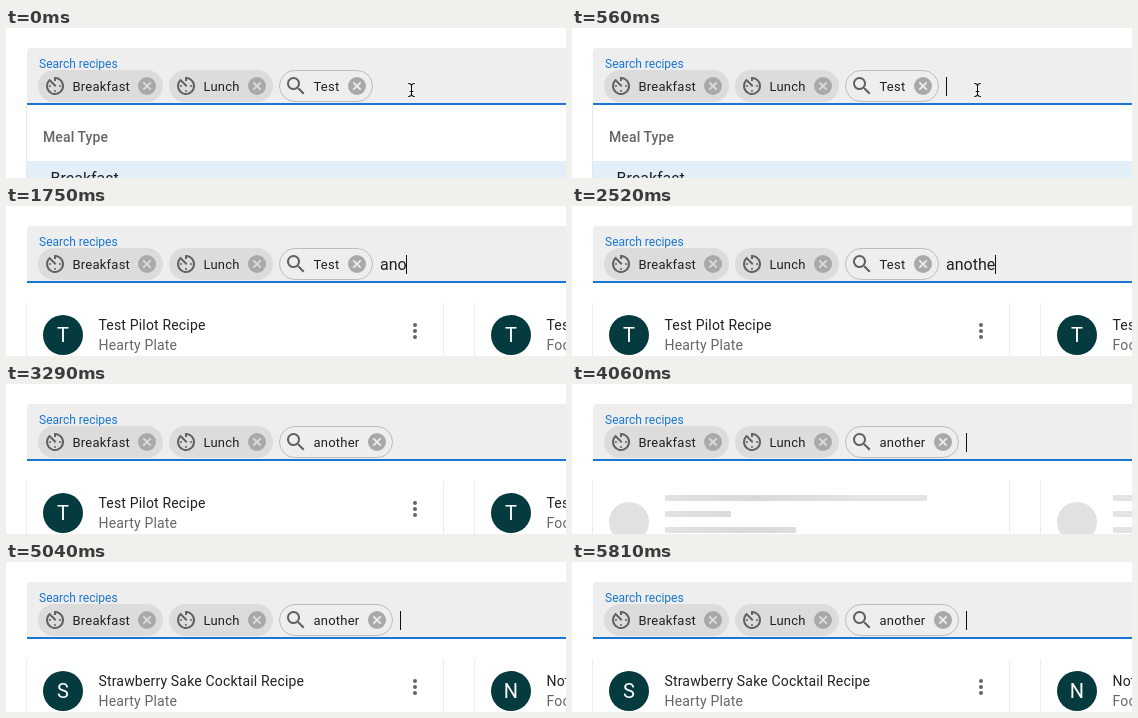
An HTML page that plays this animation: 560x150 px, repeating every 5880 ms.

```html
<!DOCTYPE html>
<html lang="en">
<head>
<meta charset="utf-8">
<title>Recipe search</title>
<style>
  html, body { margin: 0; width: 100%; height: 100%; overflow: hidden; background: #fff; }
  svg { display: block; font-family: Roboto, Arial, sans-serif; }
  .label { font-size: 12px; fill: #1976d2; }
  .chip { font-size: 13px; letter-spacing: .232px; fill: #212121; }
  .typed { font-size: 16px; fill: #212121; }
  .title { font-size: 14px; letter-spacing: .17px; fill: #212121; }
  .sub { font-size: 14px; letter-spacing: .17px; fill: #666; }
  .group { font-size: 14px; font-weight: 500; letter-spacing: .1px; fill: #666; }
  .letter { font-size: 20px; fill: #fff; text-anchor: middle; }
  .icon { fill: #616161; }
</style>
</head>
<body>
<svg id="stage" width="560" height="150" viewBox="0 0 560 150">
  <defs>
    <path id="timer" d="M11 17a1 1 0 0 0 2 0a1 1 0 0 0-2 0M11 3v4h2V5.08A7 7 0 1 1 6.58 7.58L12 13l1.41-1.41l-6.8-6.8v.02A9 9 0 1 0 12 3M18 12a1 1 0 0 0-2 0a1 1 0 0 0 2 0M6 12a1 1 0 0 0 2 0a1 1 0 0 0-2 0z"/>
    <path id="search" d="M15.5 14h-.79l-.28-.27A6.5 6.5 0 1 0 13.73 14.43l.27.28v.79l5 4.99L20.49 19zM9.5 14a4.5 4.5 0 1 1 0-9a4.5 4.5 0 0 1 0 9z"/>
    <linearGradient id="shine" gradientUnits="userSpaceOnUse" x1="0" x2="200" y1="0" y2="0">
      <stop offset="0" stop-color="#e3e3e3"/>
      <stop offset=".5" stop-color="#d9d9d9"/>
      <stop offset="1" stop-color="#e3e3e3"/>
    </linearGradient>
  </defs>

  <g id="oldCards"></g>
  <g id="skeleton"></g>
  <g id="newCards"></g>

  <g id="menu">
    <rect x="20" y="77" width="540" height="73" fill="#e6e6e6"/>
    <rect x="21" y="77" width="539" height="73" fill="#fff"/>
    <text class="group" x="37" y="114">Meal Type</text>
    <rect x="21" y="133" width="539" height="17" fill="#e2eef8"/>
    <text class="typed" x="44.5" y="156">Breakfast</text>
  </g>

  <path d="M21 75V24a4 4 0 0 1 4-4H560V75z" fill="#eee"/>
  <rect x="21" y="75" width="539" height="2" fill="#1976d2"/>
  <text class="label" x="33" y="40">Search recipes</text>
  <g id="chips"></g>
  <text class="typed" id="typed" x="374" y="64"></text>
  <rect id="caret" y="49" width="1" height="19" fill="#111" shape-rendering="crispEdges"/>
  <g id="pointer" fill="none" stroke-linecap="round">
    <path d="M402.5 55.5q3 0 3 2.5v8q0 2.5-3 2.5M408.5 55.5q-3 0-3 2.5v8q0 2.5 3 2.5M404 63.5h3" stroke="#fff" stroke-width="2.6"/>
    <path d="M402.5 55.5q3 0 3 2.5v8q0 2.5-3 2.5M408.5 55.5q-3 0-3 2.5v8q0 2.5 3 2.5M404 63.5h3" stroke="#111" stroke-width="1.1"/>
  </g>
</svg>
<script>
const LOOP = 5880, ENTER = 3080, LOAD = 3920, LOADED = 4340, MENU_CLOSE = 1610;
const WORD = 'another';
const KEYS = [1330, 1540, 1680, 1890, 2100, 2310, 2660];
const CARET_ON = [[490, 980], [1330, 3150], [3640, 4130], [4620, 5110], [5600, LOOP]];
const CARD_STEP = 448;

const $ = id => document.getElementById(id);
const show = (el, on) => el.setAttribute('visibility', on ? 'visible' : 'hidden');
const within = (t, a, b) => t >= a && t < b;

function chip(x, width, text, icon, outlined) {
  const shape = outlined
    ? `<rect x="${x + .5}" y="42.5" width="${width - 1}" height="31" rx="15.5" fill="#eee" stroke="#bdbdbd"/>`
    : `<rect x="${x}" y="42" width="${width}" height="32" rx="16" fill="#dcdcdc"/>`;
  const cx = x + width - 16;
  return `<g>${shape}
    <use class="icon" href="#${icon}" x="${x + 5}" y="46"/>
    <text class="chip" x="${x + 34.5}" y="63">${text}</text>
    <circle cx="${cx}" cy="58" r="9" fill="#a9a9a9"/>
    <path d="M${cx - 3.7} 54.3l7.4 7.4m0-7.4l-7.4 7.4" stroke="${outlined ? '#eee' : '#dcdcdc'}" stroke-width="1.8"/></g>`;
}

const edges = x => [20, 437].map(e =>
  `<rect x="${x + e}" y="97" width="1" height="53" fill="#ededed"/>`).join('');

function card(i, title, site) {
  const x = i * CARD_STEP;
  const dots = [119, 125, 131].map(y => `<circle cx="${x + 409}" cy="${y}" r="2" fill="#666"/>`).join('');
  return `${edges(x)}
    <circle cx="${x + 57}" cy="129" r="20" fill="#053b3e"/>
    <text class="letter" x="${x + 57}" y="136">${title[0]}</text>
    <text class="title" x="${x + 92.5}" y="124">${title}</text>
    <text class="sub" x="${x + 92.5}" y="144">${site}</text>${dots}`;
}

function placeholder(i) {
  const x = i * CARD_STEP;
  const bars = [262, 66, 131].map((w, n) =>
    `<rect x="${x + 93}" y="${111 + n * 16}" width="${w}" height="6" rx="1" fill="url(#shine)"/>`).join('');
  return `${edges(x)}<circle cx="${x + 57}" cy="138" r="20" fill="#e1e1e1"/>${bars}`;
}

$('chips').innerHTML = chip(32, 125, 'Breakfast', 'timer') + chip(163, 104, 'Lunch', 'timer') +
  chip(273, 94, 'Test', 'search', true) + chip(273, 114, WORD, 'search', true);
const [, , testChip, wordChip] = $('chips').children;
$('oldCards').innerHTML = card(0, 'Test Pilot Recipe', 'Hearty Plate') + card(1, 'Test Kitchen Punch', 'Food Corner');
$('newCards').innerHTML = card(0, 'Strawberry Sake Cocktail Recipe', 'Hearty Plate') + card(1, 'Not Too Sweet Punch', 'Food Corner');
$('skeleton').innerHTML = placeholder(0) + placeholder(1);

function draw(t) {
  const entered = t >= ENTER;
  const typed = entered ? '' : WORD.slice(0, KEYS.filter(k => t >= k).length);
  if ($('typed').textContent !== typed) $('typed').textContent = typed;

  const width = typed ? $('typed').getComputedTextLength() : 0;
  $('caret').setAttribute('x', entered ? 394 : Math.floor(374 + width));
  show($('caret'), CARET_ON.some(([a, b]) => within(t, a, b)));

  show($('pointer'), t < KEYS[0]);
  show($('menu'), t < MENU_CLOSE);
  show(testChip, !entered);
  show(wordChip, entered);
  show($('oldCards'), t < LOAD);
  show($('skeleton'), within(t, LOAD, LOADED));
  show($('newCards'), t >= LOADED);
  $('shine').setAttribute('gradientTransform', `translate(${40 + (t - LOAD) * .3} 0)`);
}

const start = performance.now();
function tick() {
  draw((performance.now() - start) % LOOP);
  requestAnimationFrame(tick);
}
tick();
</script>
</body>
</html>
```
